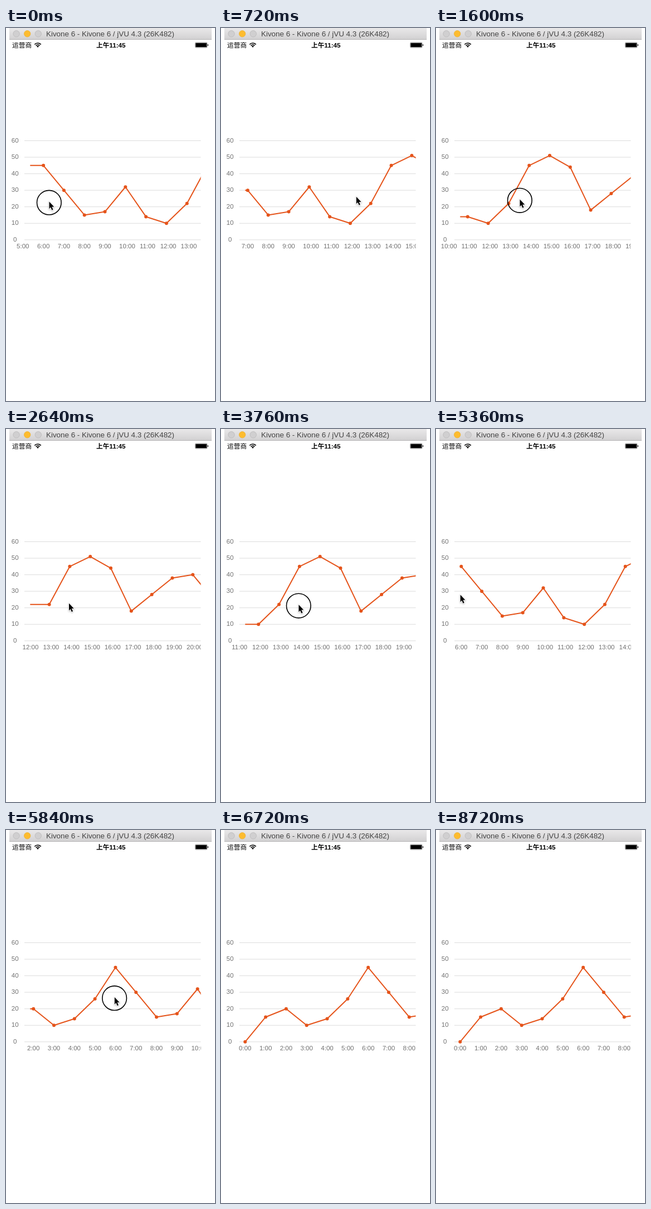
An HTML page with a canvas for the animation above (8.88 s loop, 375x667 px).

```html
<!DOCTYPE html>
<html lang="zh">
<head>
<meta charset="utf-8">
<title>Scrolling line chart</title>
<style>
  html, body { margin: 0; width: 100%; height: 100%; overflow: hidden; background: #fff; }
  canvas { display: block; }
</style>
</head>
<body>
<canvas id="stage" width="375" height="667"></canvas>
<script>
const ctx = document.getElementById('stage').getContext('2d');

const LOOP = 8880, STEP = 80, LAST = 8720;
const LEFT = 43.3, RIGHT = 349.5, GAP = 36.8, BASE = 378.8, UNIT = 2.955;
const START_SCROLL = 197, DRIFT = 15.3, GLIDE = 200, SETTLE = 80, EXIT_TIME = 480;
const ORANGE = '#e5541b';
const SANS = '"Liberation Sans", Arial, sans-serif';
const CJK = '"Liberation Sans", "Noto Sans CJK SC", "Noto Sans CJK", sans-serif';

const values = [0, 15, 20, 10, 14, 26, 45, 30, 15, 17, 32,
                14, 10, 22, 45, 51, 44, 18, 28, 38, 40, 25];

const drags = [
  { press: 0,    release: 160,  from: [77, 310],    to: [36.3, 311] },
  { press: 1010, release: 1760, from: [288.3, 299], to: [112.5, 308] },
  { press: 3680, release: 4315, from: [112.5, 315], to: [322.5, 306] },
  { press: 5440, release: 6080, from: [43.2, 296],  to: [285, 300] }
];
const exit = { press: 6080 + EXIT_TIME, from: [390, 305] };

const mix = (a, b, k) => a + (b - a) * k;
const clamp = (v, lo, hi) => Math.max(lo, Math.min(hi, v));
const progress = (t, a, b) => clamp((t - a) / (b - a), 0, 1);
const smooth = k => k * k * (3 - 2 * k);
const easeOut = k => 1 - (1 - k) ** 3;

// The hand drags at a steady speed, then eases over to the next press.
function pointerAt(t) {
  const i = drags.findLastIndex(d => d.press <= t);
  const drag = drags[i], next = drags[i + 1] || exit;
  const between = (a, b, k) => a.map((v, n) => mix(v, b[n], k));
  return t <= drag.release
    ? between(drag.from, drag.to, progress(t, drag.press, drag.release))
    : between(drag.to, next.from, smooth(progress(t, drag.release, next.press - SETTLE)));
}

// Content follows each drag, then coasts a little in the same direction.
function scrollAt(t) {
  return drags.filter(d => d.press <= t).reduce((scroll, d) => {
    const distance = d.from[0] - d.to[0];
    const moved = distance * progress(t, d.press, d.release);
    const coast = Math.sign(distance) * DRIFT * easeOut(progress(t, d.release, d.release + GLIDE));
    return Math.max(0, scroll + moved + coast);
  }, START_SCROLL);
}

function text(str, x, y, font, color, align = 'left') {
  ctx.font = font;
  ctx.fillStyle = color;
  ctx.textAlign = align;
  ctx.fillText(str, x, y);
}

function disc(x, y, r, fill, stroke) {
  ctx.beginPath();
  ctx.arc(x, y, r, 0, Math.PI * 2);
  if (fill) { ctx.fillStyle = fill; ctx.fill(); }
  if (stroke) { ctx.strokeStyle = stroke; ctx.stroke(); }
}

function clipped(x, y, w, h, draw) {
  ctx.save();
  ctx.beginPath();
  ctx.rect(x, y, w, h);
  ctx.clip();
  draw();
  ctx.restore();
}

function drawTitleBar() {
  const shade = ctx.createLinearGradient(0, 0, 0, 21);
  shade.addColorStop(0, '#e9e8e9');
  shade.addColorStop(1, '#d1d0d1');
  ctx.fillStyle = shade;
  ctx.fillRect(6, 0, 363, 20.5);
  ctx.fillStyle = '#b4b3b4';
  ctx.fillRect(6, 20, 363, 1);
  ctx.lineWidth = 0.8;
  ['#d0cfd0', '#fdbc2f', '#d0cfd0'].forEach((fill, i) =>
    disc(18.6 + 19.6 * i, 10.3, 5.7, fill, i === 1 ? '#eeb02e' : '#b9b8b9'));
  text('Kivone 6 - Kivone 6 / jVU 4.3 (26K482)', 72, 15, '13.4px ' + SANS, '#444');
}

function drawStatusBar() {
  text('运营商', 11, 35, '500 11.7px ' + CJK, '#000');
  text('上午11:45', 188.3, 35, 'bold 11.7px ' + CJK, '#000', 'center');

  const wave = r => ctx.arc(57, 34.8, r, -Math.PI * 0.76, -Math.PI * 0.24);
  ctx.strokeStyle = '#000';
  ctx.lineWidth = 1.7;
  for (const r of [4.6, 7.8]) {
    ctx.beginPath();
    wave(r);
    ctx.stroke();
  }
  ctx.beginPath();
  ctx.moveTo(57, 34.8);
  wave(2.8);
  ctx.fill();

  ctx.strokeStyle = '#666';
  ctx.lineWidth = 0.8;
  ctx.beginPath();
  ctx.roundRect(339.5, 26, 21.5, 9, 1.8);
  ctx.stroke();
  ctx.fillRect(340.4, 26.9, 19.7, 7.2);
  ctx.beginPath();
  ctx.roundRect(361.7, 29, 1.2, 3, 0.6);
  ctx.fill();
}

function drawAxis() {
  for (let v = 0; v <= 60; v += 10) {
    const y = BASE - v * UNIT;
    ctx.fillStyle = '#dcdcdc';
    ctx.fillRect(33, y - 0.5, 316.5, 1);
    text(v, 16.2, y + 3.2, '11.5px ' + SANS, '#707070', 'center');
  }
}

function drawSeries(scroll) {
  const points = values.map((v, i) => ({ x: LEFT + i * GAP - scroll, y: BASE - v * UNIT }));

  clipped(0, 380, RIGHT, 20, () => points.forEach((p, i) => {
    if (p.x > 18) text(i + ':00', p.x - 11.2, 394.4, '11.5px ' + SANS, '#707070');
  }));

  const shown = points.filter(p => p.x >= LEFT - 0.5);
  clipped(LEFT - 4, 190, RIGHT - LEFT + 4, 195, () => {
    ctx.beginPath();
    ctx.moveTo(LEFT, shown[0].y);
    shown.forEach(p => ctx.lineTo(p.x, p.y));
    ctx.strokeStyle = ORANGE;
    ctx.lineWidth = 2;
    ctx.lineJoin = 'round';
    ctx.stroke();
    shown.filter(p => p.x < RIGHT).forEach(p => disc(p.x, p.y, 3, ORANGE));
  });
}

function drawPointer([x, y], pressed) {
  if (pressed) {
    ctx.lineWidth = 1.6;
    disc(x + 0.3, y + 2.2, 21.8, null, '#000');
  }
  const arrow = [[0, 0], [0, 14], [3, 11], [5.5, 16.5], [8, 15.5], [5.5, 10], [10, 10]];
  ctx.save();
  ctx.translate(x + 0.5, y + 0.5);
  ctx.scale(0.88, 0.92);
  ctx.beginPath();
  arrow.forEach(p => ctx.lineTo(...p));
  ctx.closePath();
  ctx.shadowColor = 'rgba(0,0,0,.3)';
  ctx.shadowBlur = 3;
  ctx.shadowOffsetY = 1;
  ctx.lineWidth = 1.8;
  ctx.strokeStyle = '#fff';
  ctx.stroke();
  ctx.shadowColor = 'transparent';
  ctx.fillStyle = '#000';
  ctx.fill();
  ctx.restore();
}

function render(now) {
  const t = Math.min(LAST, Math.floor((now % LOOP) / STEP) * STEP);
  const pressed = drags.some(d => t >= d.press && t <= d.release);
  ctx.fillStyle = '#fff';
  ctx.fillRect(0, 0, 375, 667);
  drawTitleBar();
  drawStatusBar();
  drawAxis();
  drawSeries(scrollAt(t));
  clipped(0, 0, 369, 667, () => drawPointer(pointerAt(t), pressed));
}

const start = performance.now();
function tick() {
  render(performance.now() - start);
  requestAnimationFrame(tick);
}
tick();
</script>
</body>
</html>
```
